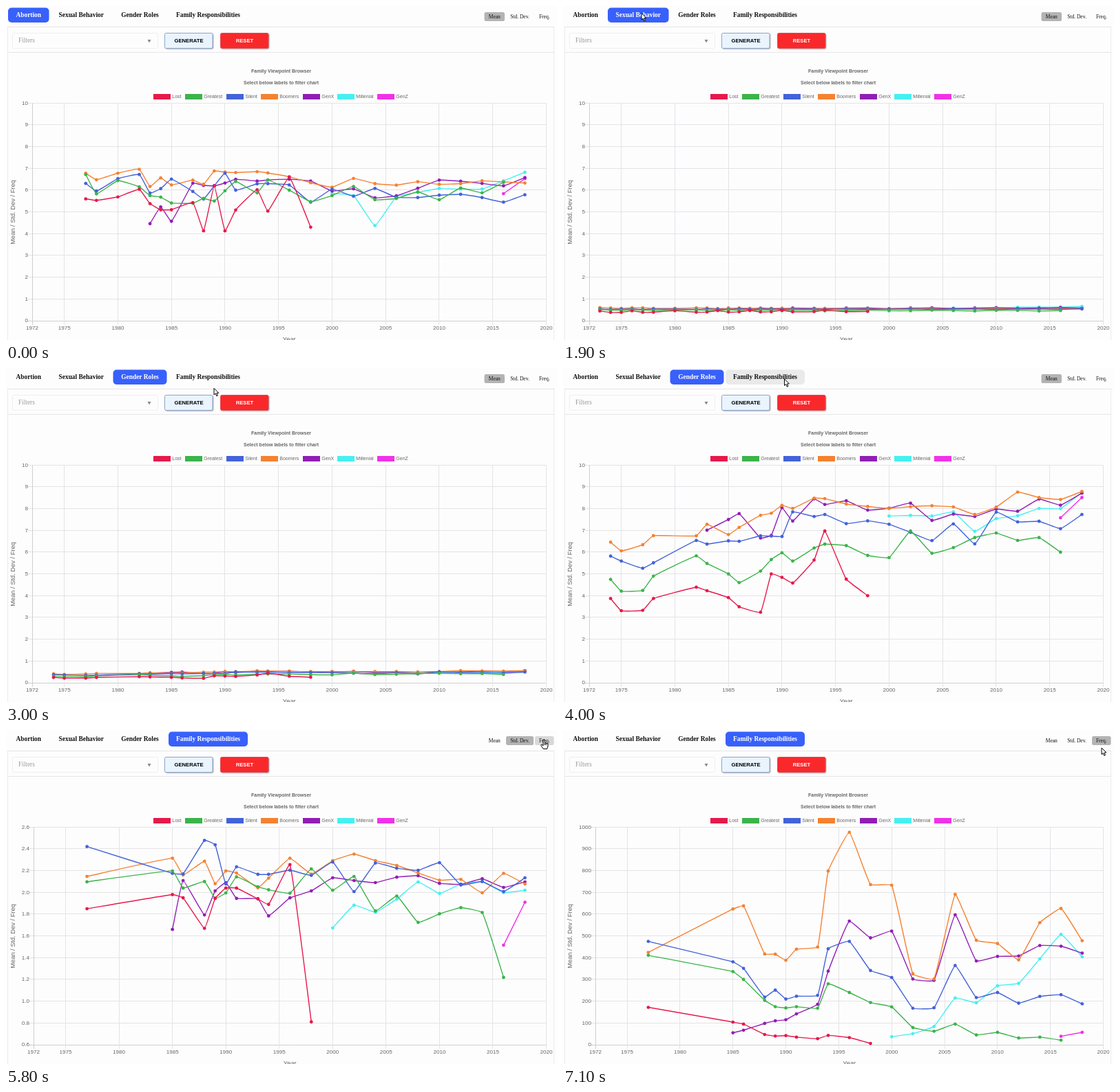
An HTML page with a canvas for the animation above (7.2 s loop, 800 by 486 pixels).

```html
<!DOCTYPE html>
<html lang="en">
<head>
<meta charset="utf-8">
<title>Family Viewpoint Browser</title>
<style>
html, body { margin: 0; width: 100%; height: 100%; overflow: hidden; background: #fefdfe; }
canvas { display: block; }
</style>
</head>
<body>
<canvas id="stage" width="800" height="486"></canvas>
<script>
const ctx = document.getElementById('stage').getContext('2d');
const LOOP = 7200, GROW = 800, TOP = 141.3, BOTTOM = 458, RIGHT = 784.5;
const SERIF = '"Liberation Serif", serif', SANS = '"Liberation Sans", sans-serif';

const recent = Array.from({ length: 10 }, (_, i) => 2000 + 2 * i);
const survey = (...early) => [...early.map(y => 1900 + y), ...recent];

const generations = [
  ['Lost', '#e6194b', 214], ['Greatest', '#3cb44b', 260], ['Silent', '#4363d8', 320],
  ['Boomers', '#f58231', 370], ['GenX', '#911eb4', 431], ['Millenial', '#46f0f0', 481],
  ['GenZ', '#f032e6', 539]
];

function makeChart(start, years, left, min, max, digits) {
  const chart = { start, years, left, min, max, digits, series: [] };
  chart.add = (...values) => { chart.series.push(values); return chart; };
  return chart;
}

const abortion = makeChart(-2000,
  survey(77, 78, 80, 82, 83, 84, 85, 87, 88, 89, 90, 91, 93, 94, 96, 98), 38, 0, 10, 0)
  .add(5.6, 5.53, 5.69, 6.04, 5.38, 5.1, 5.1, 5.43, 4.13, 6.2, 4.13, 5.09, 6.02, 5.04, 6.6, 4.3)
  .add(6.72, 5.83, 6.44, 6.15, 5.75, 5.68, 5.41, 5.4, 5.62, 5.5, 5.97, 6.4, 5.88, 6.47, 6, 5.47,
    5.75, 6.17, 5.56, 5.62, 5.92, 5.56, 6.1, 5.88, 6.36)
  .add(6.31, 5.96, 6.53, 6.72, 5.87, 6.07, 6.51, 5.94, 5.59, 6.2, 6.78, 6, 6.29, 6.3, 6.24, 5.45,
    6.05, 5.72, 6.08, 5.67, 5.66, 5.77, 5.81, 5.66, 5.45, 5.79)
  .add(6.78, 6.48, 6.78, 6.96, 6.17, 6.56, 6.24, 6.46, 6.27, 6.88, 6.83, 6.81, 6.85, 6.79, 6.62, 6.34,
    6.14, 6.54, 6.3, 6.23, 6.39, 6.27, 6.3, 6.43, 6.38, 6.33)
  .add(4.46, 5.23, 4.57, 6.32, 6.22, 6.2, 6.33, 6.5, 6.42, 6.47, 6.5, 6.42,
    5.96, 6.06, 5.65, 5.74, 6.09, 6.46, 6.41, 6.31, 6.2, 6.58)
  .add(5.85, 5.75, 4.37, 5.7, 5.9, 6.08, 6.05, 6.05, 6.43, 6.82)
  .add(5.84, 6.53);

// Nearly level series with a small wobble.
const sway = (count, base, rise, amp, pace) =>
  Array.from({ length: count }, (_, i) => base + rise * i + amp * Math.cos(i * pace));

const behavior = makeChart(1873,
  survey(73, 74, 75, 76, 77, 78, 80, 82, 83, 84, 85, 86, 87, 88, 89, 90, 91, 93, 94, 96, 98), 38, 0, 10, 0)
  .add(...sway(21, 3.15, .016, .35, 2.1))
  .add(...sway(30, 3.85, -.008, .15, 1.9))
  .add(...sway(31, 4.15, 0, .1, 2.3))
  .add(...sway(31, 4.6, -.012, .12, 1.7))
  .add(...sway(21, 4.35, .012, .16, 2))
  .add(...sway(10, 4.1, .11, .1, 2))
  .add(4.45, 4.65);

const roles = makeChart(2987,
  survey(74, 75, 77, 78, 82, 83, 85, 86, 88, 89, 90, 91, 93, 94, 96, 98), 38, 0, 10, 0)
  .add(3.87, 3.31, 3.33, 3.87, 4.39, 4.23, 3.91, 3.49, 3.24, 5, 4.84, 4.58, 5.64, 6.97, 4.76, 4)
  .add(4.75, 4.21, 4.24, 4.9, 5.83, 5.48, 5, 4.6, 5.13, 5.66, 5.97, 5.59, 6.19, 6.37, 6.3, 5.85,
    5.75, 6.97, 5.95, 6.21, 6.67, 6.88, 6.54, 6.67, 6)
  .add(5.82, 5.59, 5.26, 5.51, 6.54, 6.37, 6.52, 6.5, 6.75, 6.74, 6.72, 7.85, 7.64, 7.73, 7.31, 7.44,
    7.28, 6.91, 6.53, 7.3, 6.38, 7.84, 7.39, 7.42, 7.08, 7.73)
  .add(6.46, 6.06, 6.34, 6.76, 6.75, 7.28, 6.81, 7.14, 7.69, 7.79, 8.15, 8.01, 8.48, 8.46, 8.21, 8.1,
    8.01, 8.09, 8.13, 8.08, 7.73, 8.07, 8.76, 8.51, 8.42, 8.79)
  .add(7.01, 7.5, 7.77, 6.65, 6.77, 8.04, 7.43, 8.45, 8.19, 8.36, 7.93,
    8.02, 8.25, 7.46, 7.75, 7.64, 7.98, 7.88, 8.44, 8.16, 8.71)
  .add(7.66, 7.69, 7.66, 7.85, 6.96, 7.54, 7.67, 8.01, 8, 8.75)
  .add(7.58, 8.51);

const familyYears = survey(77, 85, 86, 88, 89, 90, 91, 93, 94, 96, 98);

const familyMean = makeChart(4050, familyYears, 38, 0, 10, 0)
  .add(2.74, 3.92, 3.28, 3.56, 3.52, 3.82, 3.8, 3.17, 3.58, 4.06, 4.4)
  .add(3.62, 4.2, 4.2, 4.19, 4.41, 4.37, 4.3, 4.5, 4.3, 4.19, 4.18,
    4.02, 4.12, 4.85, 4.5, 4.52, 4.45, 4.45, 4.96, 4.47)
  .add(4.41, 5.15, 5.33, 5.41, 5.27, 5.2, 5.32, 5.48, 5.55, 5.14, 5.33,
    4.63, 4.94, 5.08, 5.3, 5.29, 5.46, 5.51, 5.4, 5.46, 5.35)
  .add(5.19, 5.91, 5.97, 6.12, 6.09, 6.07, 6.06, 6.06, 6.23, 5.86, 5.98,
    5.6, 5.69, 5.75, 5.83, 5.96, 6.01, 5.93, 6.28, 6.42, 6.27)
  .add(5.43, 5.98, 6.18, 6.01, 6.03, 5.78, 6.47, 6.55, 6.27, 6.21,
    6.02, 6.01, 6.15, 5.88, 6.05, 6.34, 6.34, 6.5, 6.55, 6.61)
  .add(6.11, 6.16, 6.05, 6.3, 6.35, 6.62, 6.34, 6.56, 6.92, 6.87)
  .add(6.78, 6.51);

const familyDev = makeChart(4830, familyYears, 40, .6, 2.6, 1)
  .add(1.85, 1.98, 1.95, 1.67, 1.945, 2.04, 2.04, 1.94, 1.89, 2.255, .81)
  .add(2.097, 2.197, 2.04, 2.1, 1.945, 1.995, 2.143, 2.052, 2.024, 1.993, 2.216,
    2.02, 2.147, 1.83, 1.967, 1.724, 1.803, 1.86, 1.815, 1.219)
  .add(2.421, 2.175, 2.17, 2.478, 2.437, 2.077, 2.235, 2.166, 2.166, 2.204, 2.156,
    2.279, 2.007, 2.27, 2.222, 2.203, 2.273, 2.068, 2.1, 2.008, 2.134)
  .add(2.147, 2.314, 2.16, 2.286, 2.08, 2.197, 2.178, 2.043, 2.131, 2.314, 2.169,
    2.292, 2.352, 2.292, 2.248, 2.178, 2.112, 2.12, 1.996, 2.175, 2.077)
  .add(1.66, 2.109, 1.793, 2.014, 2.09, 1.945, 1.942, 1.784, 1.95, 2.014,
    2.134, 2.109, 2.09, 2.14, 2.153, 2.083, 2.074, 2.125, 2.046, 2.096)
  .add(1.673, 1.882, 1.818, 1.938, 2.096, 1.99, 2.077, 2.1, 1.998, 2.02)
  .add(1.515, 1.91);

const familyFreq = makeChart(5930, familyYears, 47, 0, 1000, 0)
  .add(172, 104, 95, 47, 40, 42, 35, 28, 43, 33, 6)
  .add(411, 336, 300, 204, 175, 169, 175, 168, 280, 240, 194, 174, 79, 62, 95, 45, 57, 31, 35, 21)
  .add(475, 381, 351, 219, 251, 210, 223, 227, 441, 475, 341, 309, 168, 170, 364, 217, 240, 191, 222, 230, 188)
  .add(424, 624, 638, 417, 416, 388, 439, 449, 798, 976, 736, 733, 326, 302, 691, 480, 465, 390, 561, 626, 478)
  .add(55, 67, 98, 110, 115, 142, 186, 338, 568, 491, 522, 302, 296, 597, 385, 406, 408, 456, 453, 421)
  .add(37, 51, 84, 215, 193, 271, 282, 395, 507, 404)
  .add(39, 57);

const charts = [abortion, behavior, roles, familyMean, familyDev, familyFreq];

// label, left, width, time of the click
const tabs = [['Abortion', 3, 59.5, -1], ['Sexual Behavior', 65, 88.5, 1800],
  ['Gender Roles', 155.5, 78, 2600], ['Family Responsibilities', 236, 115, 4020]];
const modes = [['Mean', 694.5, 29.5, -1], ['Std. Dev.', 726, 40, 4800], ['Freq.', 768, 27.5, 5900]];

// time, x, y of the pointer tip
const path = [[1100, 114, -20], [1700, 114, 10.5], [2000, 114, 10.5], [2450, 195, 14], [2650, 195, 14],
  [3000, 302, 29.5], [3400, 320, 18], [4000, 321.5, 16], [4100, 321.5, 16], [4600, 743, 15.5],
  [4900, 743, 15.5], [5500, 781, 14], [6000, 781, 14], [6300, 782, 26]];

const latest = (list, t, key) => list.filter(item => key(item) <= t).pop();

function pointer(t) {
  if (t <= path[0][0]) return path[0].slice(1);
  const i = path.findIndex(p => p[0] > t);
  if (i < 0) return path[path.length - 1].slice(1);
  const [t0, x0, y0] = path[i - 1], [t1, x1, y1] = path[i];
  const p = (t - t0) / (t1 - t0), e = p * p * (3 - 2 * p);
  return [x0 + (x1 - x0) * e, y0 + (y1 - y0) * e];
}

function text(str, x, y, font, color, align = 'center') {
  ctx.font = font;
  ctx.fillStyle = color;
  ctx.textAlign = align;
  ctx.textBaseline = 'middle';
  ctx.fillText(str, x, y);
}

function line(x0, y0, x1, y1, color) {
  ctx.strokeStyle = color;
  ctx.lineWidth = 1;
  ctx.beginPath();
  ctx.moveTo(x0, y0);
  ctx.lineTo(x1, y1);
  ctx.stroke();
}

function box(x, y, w, h, r, fill, stroke) {
  ctx.beginPath();
  ctx.roundRect(x, y, w, h, r);
  if (fill) { ctx.fillStyle = fill; ctx.fill(); }
  if (stroke) { ctx.strokeStyle = stroke; ctx.lineWidth = 1; ctx.stroke(); }
}

function polygon(points, fill, stroke) {
  ctx.beginPath();
  points.forEach(([x, y]) => ctx.lineTo(x, y));
  ctx.closePath();
  ctx.fillStyle = fill;
  ctx.fill();
  if (stroke) { ctx.strokeStyle = stroke; ctx.lineWidth = 1; ctx.stroke(); }
}

function buttonRow(items, t, [px, py], y, h, r, colors, font, weight) {
  const active = latest(items, t, item => item[3]);
  let hovered = false;
  for (const item of items) {
    const [label, x, w] = item;
    const over = px >= x && px <= x + w && py >= y && py <= y + h;
    hovered = hovered || over;
    if (item === active) box(x, y, w, h, r, colors[0]);
    else if (over) box(x, y, w, h, r, colors[1]);
    text(label, x + w / 2, y + h / 2 + .3, font, item === active ? weight : '#111');
  }
  return hovered;
}

function actionButton(label, x, fill, edge, color) {
  ctx.save();
  ctx.shadowColor = 'rgba(0,0,0,.45)';
  ctx.shadowBlur = 2;
  ctx.shadowOffsetX = ctx.shadowOffsetY = 1;
  box(x + .5, 39.5, 69.5, 22, 2, fill);
  ctx.restore();
  box(x + .5, 39.5, 69.5, 22, 2, null, edge);
  text(label, x + 35.5, 50.8, `bold 7.7px ${SANS}`, color);
}

function drawFrame() {
  line(2, 30.5, 796, 30.5, '#e4e4e6');
  line(2.5, 31, 2.5, 486, '#ebebee');
  line(795.5, 31, 795.5, 486, '#ebebee');
  line(3, 67.5, 796, 67.5, '#e6e6e8');
  box(9.5, 39.5, 211, 22, 2, null, '#eeeef0');
  text('Filters', 18, 50.8, `9.3px ${SERIF}`, '#999', 'left');
  polygon([[205.5, 49], [210.5, 49], [208, 53.5]], '#888');
  actionButton('GENERATE', 230, '#e9f4fe', '#8ca6cc', '#000');
  actionButton('RESET', 311, '#f9282b', '#e8474c', '#fff');
}

function drawAxes(chart) {
  const { left, min, max, digits } = chart;
  const grid = '#e4e3e5', font = `8.1px ${SANS}`;
  for (let i = 0; i <= 10; i++) {
    const y = BOTTOM - (BOTTOM - TOP) * i / 10;
    line(left - 6, Math.floor(y) + .5, RIGHT, Math.floor(y) + .5, i ? grid : '#cfced0');
    text((min + (max - min) * i / 10).toFixed(digits), left - 6, y, font, '#666', 'right');
  }
  for (const year of [1972, ...Array.from({ length: 10 }, (_, i) => 1975 + 5 * i)]) {
    const x = left + (RIGHT - left) * (year - 1972) / 48;
    line(Math.floor(x) + .5, TOP, Math.floor(x) + .5, 464, year === 1972 ? '#cfced0' : grid);
    text(year, x, 468.3, font, '#666');
  }
  text('Year', (left + RIGHT) / 2, 485, `9.3px ${SANS}`, '#666');
  ctx.save();
  ctx.translate(10.5, 300);
  ctx.rotate(-Math.PI / 2);
  text('Mean / Std. Dev / Freq', 0, 0, `9.3px ${SANS}`, '#666');
  ctx.restore();
}

// Control points of a lightly tensioned spline around one point.
function controls(points, i) {
  const cur = points[i], prev = points[i - 1] || cur, next = points[i + 1] || cur;
  const before = Math.hypot(cur[0] - prev[0], cur[1] - prev[1]);
  const after = Math.hypot(next[0] - cur[0], next[1] - cur[1]);
  const shift = d => cur.map((v, k) => v + .1 * d / (before + after) * (next[k] - prev[k]));
  return [shift(-before), shift(after)];
}

function drawSeries(points, color) {
  ctx.strokeStyle = ctx.fillStyle = color;
  ctx.lineWidth = 1.4;
  ctx.lineJoin = 'round';
  ctx.beginPath();
  ctx.moveTo(...points[0]);
  for (let i = 1; i < points.length; i++) {
    ctx.bezierCurveTo(...controls(points, i - 1)[1], ...controls(points, i)[0], ...points[i]);
  }
  ctx.stroke();
  for (const [x, y] of points) {
    ctx.beginPath();
    ctx.arc(x, y, 2.4, 0, 7);
    ctx.fill();
  }
}

function drawChart(t) {
  const chart = latest(charts, t, c => c.start);
  const { left, min, max, years, series } = chart;
  const grown = 1 - (1 - Math.min(1, (t - chart.start) / GROW)) ** 4;
  text('Family Viewpoint Browser', 399.5, 95.5, `bold 7px ${SANS}`, '#666');
  text('Select below labels to filter chart', 399.5, 112, `bold 7px ${SANS}`, '#666');
  generations.forEach(([name, color, x]) => {
    box(x, 128, 25, 8, 0, color);
    text(name, x + 27.3, 132, `7px ${SANS}`, '#666', 'left');
  });
  drawAxes(chart);
  for (let s = series.length - 1; s >= 0; s--) {
    const skip = s < 4 ? 0 : years.length - series[s].length;
    drawSeries(series[s].map((value, i) => [
      left + (RIGHT - left) * (years[i + skip] - 1972) / 48,
      BOTTOM - (BOTTOM - TOP) * (value - min) / (max - min) * grown
    ]), generations[s][1]);
  }
}

function drawPointer([x, y], hand) {
  ctx.save();
  ctx.translate(x, y);
  ctx.lineJoin = 'round';
  if (hand) {
    polygon([[-1, 0], [1, 0], [1.3, 4.5], [5.5, 5.8], [6, 9], [4.5, 13.5], [-1, 13.5],
      [-4.3, 8.5], [-3.5, 7], [-1, 8.8]], '#fff', '#000');
    for (const fx of [1.2, 3.2]) line(fx, 5, fx, 8, '#000');
  } else {
    polygon([[0, 0], [0, 9.5], [2.2, 7.6], [3.8, 11.3], [5.4, 10.6], [3.9, 7], [6.8, 6.8]], '#fff', '#000');
  }
  ctx.restore();
}

function draw(now) {
  const t = Math.floor(now % LOOP / 100) * 100;
  const tip = pointer(t);
  ctx.fillStyle = '#fefdfe';
  ctx.fillRect(0, 0, 800, 486);
  drawFrame();
  buttonRow(tabs, t, tip, 2.5, 21.5, 5, ['#3860fb', '#ebeaeb'], `bold 9.4px ${SERIF}`, '#fff');
  const hand = buttonRow(modes, t, tip, 9, 13, 2.5, ['#b4b3b4', '#d9d8d9'], `7.5px ${SERIF}`, '#111');
  drawChart(t);
  drawPointer(tip, hand);
}

let began;
function tick(now) {
  began ??= now;
  draw(now - began);
  requestAnimationFrame(tick);
}
draw(0);
requestAnimationFrame(tick);
</script>
</body>
</html>
```
